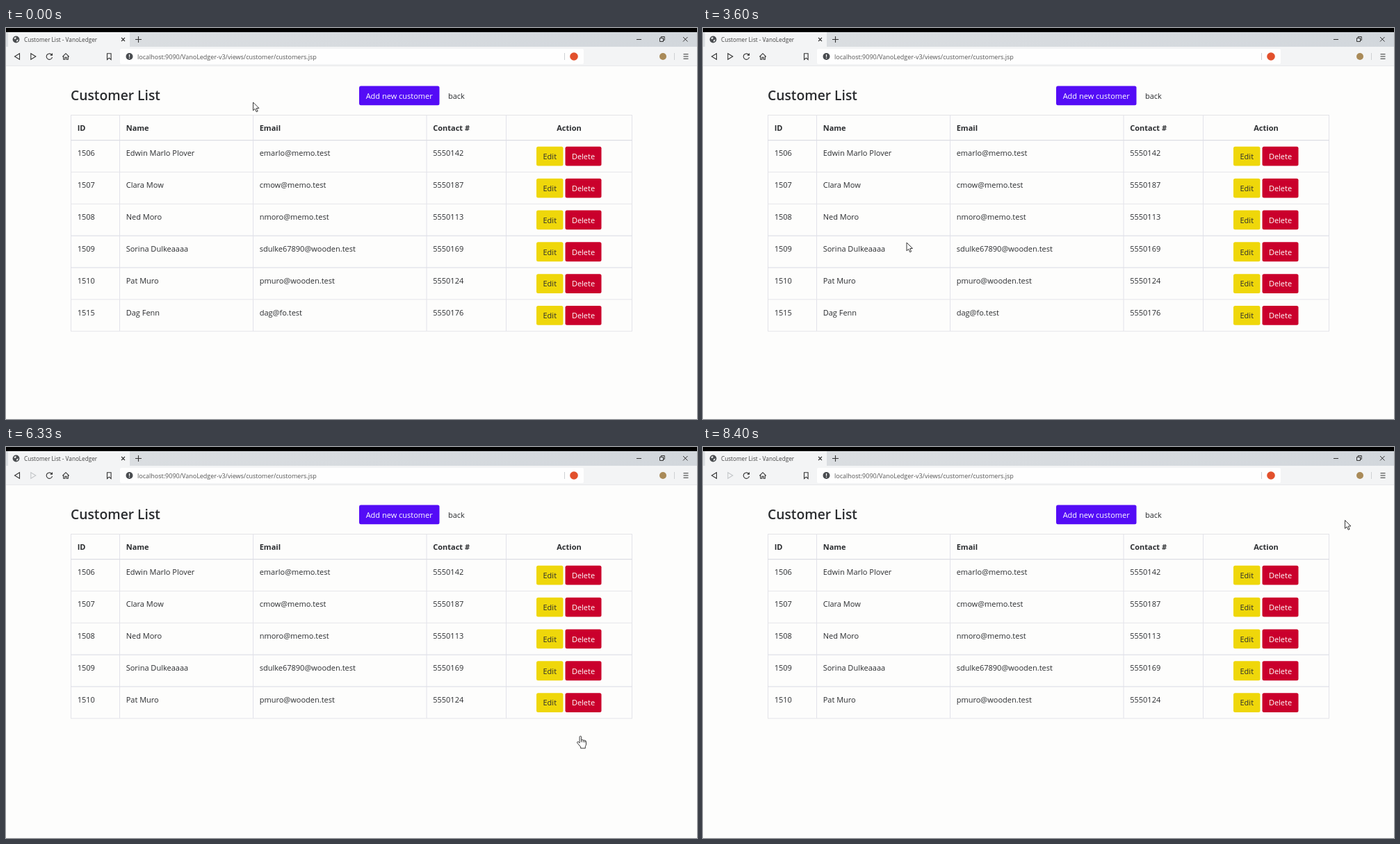
Write an HTML page that moves like this. It is 994 px wide and 563 px high and loops after 8790 ms.

```html
<!DOCTYPE html>
<html lang="en">
<head>
<meta charset="utf-8">
<title>Customer List</title>
<style>
  html, body { margin: 0; width: 100%; height: 100%; overflow: hidden; background: #fdfdfc; }
  svg { display: block; width: 994px; height: 563px; }
  text { font: 11px "Open Sans", "Noto Sans", sans-serif; fill: #2b2d30; white-space: pre; }
  .b { font-weight: 700; }
  .mid { text-anchor: middle; }
  .white { fill: #fff; }
  .icon { fill: none; stroke: #333; stroke-width: 1.1; }
</style>
</head>
<body>
<svg id="stage" viewBox="0 0 994 563">
  <defs>
    <linearGradient id="strip"><stop stop-color="#dcdfe2"/><stop offset="1" stop-color="#d2d7dc"/></linearGradient>
  </defs>
  <rect width="994" height="563" fill="#fdfdfc"/>
  <rect y="6" width="994" height="21" fill="url(#strip)"/>
  <rect width="994" height="6"/>
  <rect x="3" y="6" width="175" height="22" fill="#f3f4f5"/>
  <rect y="27" width="994" height="27" fill="#f3f4f5"/>
  <path d="M0 54.4H994" stroke="#e6e7e9"/>
  <rect x="164" y="30" width="667" height="22" rx="2" fill="#fefefe"/>

  <circle cx="14.5" cy="16.5" r="4.9" fill="#4a4d50"/>
  <path d="M11.3 14.6l2.6-1.6 1 1.8-2 1.8zM15.2 17.2l2.6-.8-.8 2.6-1.8 1z" fill="#e8e9ea"/>
  <text x="26" y="19.7" style="font-size:8.2px;fill:#444">Customer List - VanoLedger</text>
  <g class="icon">
    <path d="M166 14l5 5m0-5l-5 5M186 16.5h9M190.5 12v9"/>
    <path d="M907 16.5h7M940.5 14.5h5v5h-5zM942.3 14.300v-1.800h5v5h-1.600M974 13l6.500 6.500m0-6.500l-6.500 6.500" stroke-width="1"/>
    <path d="M19.500 36.800v8.400l-7-4.200z"/>
    <path id="forward" d="M35.800 36.800v8.400l7-4.200z"/>
    <path d="M65.500 38.300A4.200 4.200 0 1 0 66.500 42"/>
    <path d="M67 36v3.800h-3.800z" fill="#333" stroke="none"/>
    <path d="M81.300 41.300l4.700-4.600 4.700 4.600M82.700 40.500v4.800h2.200v-3h2.200v3h2.200v-4.800"/>
    <path d="M145.500 36.700h5.600v8.800l-2.800-2.400-2.800 2.400z"/>
    <path d="M974.500 37.700h7M974.500 41h7M974.500 44.300h7"/>
  </g>
  <path d="M803.500 36v10M961.500 36v10" stroke="#cfd1d4"/>
  <circle cx="177.500" cy="41" r="5" fill="#484b4f"/>
  <path d="M177.500 38v3.700m0 1.100v1.300" stroke="#fff" stroke-width="1.200"/>
  <text x="189" y="44.600" style="font-size:9px;fill:#555">localhost:9090/VanoLedger-v3/views/customer/customers.jsp</text>
  <circle cx="817" cy="41" r="5.800" fill="#e2502c"/>
  <circle cx="945" cy="41" r="5" fill="#a98a58"/>

  <text x="93" y="104" style="font-size:19.3px;font-weight:600">Customer List</text>
  <rect x="508" y="83.500" width="115.500" height="27.800" rx="2.500" fill="#540cf6"/>
  <text x="565.700" y="101.800" class="mid white">Add new customer</text>
  <text x="636" y="101.800">back</text>
  <g id="table"></g>
  <path id="arrow" d="M0 0v11.800l2.700-2.500 2 4.400 1.900-.8-1.900-4.300 3.700-.2z" fill="#fff" stroke="#222" stroke-width=".9"/>
  <path id="hand" d="M-1.400 8.500V1.200q0-1.400 1.300-1.400t1.300 1.400v4.200q2-.9 2.600.4 1.900-.7 2.400.6 1.800-.3 1.800 1.400v3.700q0 1.600-1.200 3.200v2.600h-6.600v-1.900L-4.600 9.700q-.8-1.600.6-2 1-.1 2.600 2zM1.200 5.400v3.200M3.800 5.800v3M6.200 6.400v2.600" fill="#fff" stroke="#222" stroke-width=".9"/>
</svg>
<script>
const $ = id => document.getElementById(id);
const TOP = 161.6, STEP = 45.85, LOOP = 8790;
const cols = [93.5, 163.5, 355.5, 605, 719.5, 900.5];
const people = [
  ["1506", "Edwin Marlo Plover", "emarlo@memo.test", "5550142"],
  ["1507", "Clara Mow", "cmow@memo.test", "5550187"],
  ["1508", "Ned Moro", "nmoro@memo.test", "5550113"],
  ["1509", "Sorina Dulkeaaaa", "sdulke67890@wooden.test", "5550169"],
  ["1510", "Pat Muro", "pmuro@wooden.test", "5550124"],
  ["1515", "Dag Fenn", "dag@fo.test", "5550176"]
];
const buttons = [
  { label: "Edit", x: 763, w: 38.5, fill: "#efd70a", hover: "#cdb808", ink: "" },
  { label: "Delete", x: 804.5, w: 52, fill: "#ca002c", hover: "#a40024", ink: "white" }
];

const label = (x, y, s, cls = "") => `<text x="${x}" y="${y}" class="${cls}">${s}</text>`;
const line = (d, color, w = 1) => `<path d="${d}" stroke="${color}" stroke-width="${w}"/>`;
const sides = (y, h) => cols.map(x => line(`M${x} ${y}v${h}`, "#e2e2ea")).join("");

function buildTable() {
  const heads = ["ID", "Name", "Email", "Contact #"];
  let out = line("M93 125.5H901", "#e4e4e6") + sides(125, 36.5) +
    heads.map((s, i) => label(cols[i] + 9.2, 147.7, s, "b")).join("") +
    label(810, 147.7, "Action", "b mid");
  people.forEach((person, i) => {
    const y = TOP + i * STEP;
    out += `<g class="row"><rect class="bg" x="93.5" y="${y}" width="807" height="${STEP}" fill="none"/>` +
      sides(y, STEP) + line(`M93 ${y + STEP}H901`, i == 2 || i == 3 ? "#d9dae4" : "#e6e6ea") +
      person.map((s, j) => label(cols[j] + 9.2, y + 22.8, s)).join("") +
      buttons.map(b => `<rect class="btn" x="${b.x}" y="${y + 9.2}" width="${b.w}" height="27.8" rx="2.5"/>` +
        label(b.x + b.w / 2, y + 27.4, b.label, "mid " + b.ink)).join("") + "</g>";
  });
  $("table").innerHTML = out + line(`M93 ${TOP}H901`, "#dcdde4", 1.4);
}
buildTable();
const rows = [...document.querySelectorAll(".row")].map(el => ({
  el, bg: el.querySelector(".bg"), btns: el.querySelectorAll(".btn")
}));

const smooth = u => u * u * (3 - 2 * u), slowIn = u => u * u;
const slowOut = u => u * (2 - u), linear = u => u;
// Pointer path: tick, x, y, easing towards this point (15 ticks per second)
const path = [
  [0, 355.5, 107, linear], [12, 293, 309, smooth], [56, 293, 309, linear],
  [70, 745.5, 411, smooth], [80, 826.5, 416.5, smooth], [106, 826.5, 416.5, linear],
  [115, 790, 336.5, slowIn], [120, 909, 155, linear], [126, 923.5, 105.5, slowOut]
];
const REMOVED = 89, WAKE = 56, LEAVE = 106;

function pointer(k) {
  k = Math.max(0, Math.min(126, k));
  const i = Math.max(1, path.findIndex(p => p[0] >= k));
  const [t0, x0, y0] = path[i - 1], [t1, x1, y1, ease] = path[i];
  const u = ease((k - t0) / (t1 - t0));
  return [x0 + (x1 - x0) * u, y0 + (y1 - y0) * u];
}

function draw(ms) {
  const k = Math.floor((ms + 5) * 0.015);
  const [x, y] = pointer(k);
  const [hx, hy] = pointer(k - 1); // hover trails the pointer by one tick
  const count = k <= LEAVE ? 6 : 5;
  let over = Math.floor((hy - TOP) / STEP);
  if (k <= WAKE || over < 0 || over >= count || hx < cols[0] || hx > cols[5]) over = -1;
  const dy = hy - TOP - over * STEP;
  const onButton = over < 0 || dy < 9.2 || dy > 37 ? -1 :
    buttons.findIndex(b => hx >= b.x && hx <= b.x + b.w);

  rows.forEach((row, i) => {
    row.bg.setAttribute("fill", i == over ? "#e9e9e9" : "none");
    row.btns.forEach((el, j) =>
      el.setAttribute("fill", i == over && j == onButton ? buttons[j].hover : buttons[j].fill));
  });
  rows[5].el.style.display = k < REMOVED ? "" : "none";
  $("forward").style.stroke = k < REMOVED ? "#333" : "#c3c6c9";
  $("arrow").style.display = onButton < 0 ? "" : "none";
  $("hand").style.display = onButton < 0 ? "none" : "";
  for (const id of ["arrow", "hand"]) $(id).setAttribute("transform", `translate(${x} ${y})`);
}

const start = performance.now();
function frame() {
  draw((performance.now() - start) % LOOP);
  requestAnimationFrame(frame);
}
frame();
</script>
</body>
</html>
```
